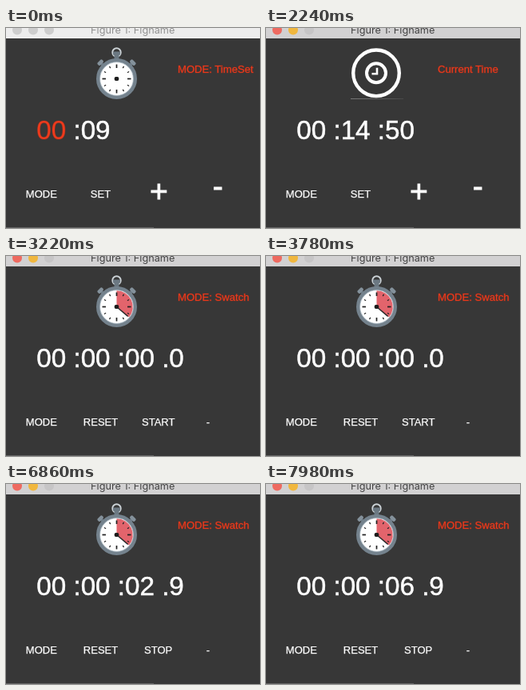
Recreate the animation shown at these times as an HTML page. Size 318 by 250 pixels, loop 8 s.

```html
<!DOCTYPE html>
<html lang="en">
<head>
<meta charset="utf-8">
<title>Stopwatch window</title>
<style>
  html, body { margin: 0; width: 100%; height: 100%; overflow: hidden; background: #373737; }
  svg { display: block; width: 318px; height: 250px; }
  text { font: 13px "Liberation Sans", Arial, sans-serif; fill: #fff; stroke: #fff; stroke-width: .25; white-space: pre; }
  .center { text-anchor: middle; }
  #title { font: 12.7px Inter, sans-serif; fill: #454545; stroke: none; }
  #mode { font-size: 13.1px; }
  #digits { font-size: 33.2px; stroke-width: .5; }
  .large { font-size: 39px; stroke-width: .9; }
  #mode, .selected { fill: #ee3a1c; stroke: #a8301c; stroke-opacity: .5; stroke-width: 1.2; paint-order: stroke; }
  #bar { fill: #d2d1d2; }
  .red { fill: #ee6a60; }
  .yellow { fill: #f0b73e; }
  .grey { fill: #c6c5c6; }
  .inactive #bar { fill: #ededed; }
  .inactive #title { fill: #929292; }
  .inactive circle { fill: #cdcdcd; }
  [hidden] { display: none; }
</style>
</head>
<body>
<svg viewBox="0 0 318 250">
  <defs>
    <linearGradient id="edge">
      <stop offset="0" stop-color="#777"/>
      <stop offset=".45" stop-color="#666"/>
      <stop offset="1" stop-color="#484848"/>
    </linearGradient>
  </defs>
  <rect width="318" height="250" fill="#373737"/>
  <path d="M0 249.5H185" stroke="#626262"/>

  <g id="window">
    <rect id="bar" width="318" height="13"/>
    <circle class="red" cx="14" cy="2.5" r="6"/>
    <circle class="yellow" cx="34" cy="2.5" r="6"/>
    <circle class="grey" cx="54" cy="2.5" r="6"/>
    <text id="title" class="center" x="158.7" y="7">Figure 1: Figname</text>
  </g>

  <g id="watch" transform="translate(138.5 63.5)">
    <g fill="#6b7882">
      <circle cy="-33" r="5.2" fill="none" stroke="#cbd2d6" stroke-width="2"/>
      <rect x="-3" y="-32" width="6" height="8"/>
      <rect x="-4.5" y="-34" width="9" height="4.5" rx="1.5"/>
      <g id="buttons"></g>
    </g>
    <circle r="23.2" fill="#fff" stroke="#74828d" stroke-width="4.6"/>
    <circle r="20.9" fill="none" stroke="#a9b6c0" stroke-width=".8"/>
    <path id="sector" fill="#e2646c"/>
    <g id="ticks" stroke="#222"></g>
    <path id="hand" stroke="#2b2b2b" stroke-width="1.5" stroke-linecap="round"/>
    <rect x="-2.8" y="-2.4" width="5.6" height="4.8" rx="1.9" fill="#1d1d1d"/>
  </g>

  <g id="clock" fill="none" stroke="#fff" transform="translate(138 56.3)">
    <circle r="28.8" stroke-width="4.4"/>
    <circle r="12" stroke-width="4"/>
    <path d="M1 -6.5V1H-5.5" stroke-width="2.6"/>
    <rect x="-32" y="31.7" width="66" height="1" fill="url(#edge)" stroke="none"/>
  </g>

  <text id="mode" x="215" y="56"></text>
  <text id="digits" x="38.3" y="139"><tspan id="hours">00</tspan><tspan id="rest"></tspan></text>

  <text class="center" x="44.3" y="212">MODE</text>
  <text id="second" class="center" x="118.5" y="212"></text>
  <g id="setKeys">
    <text class="center large" x="191.5" y="216.5">+</text>
    <text class="center large" x="265.3" y="210.5">-</text>
  </g>
  <g id="runKeys">
    <text id="third" class="center" x="190.7" y="212"></text>
    <text class="center" x="253" y="212">-</text>
  </g>
</svg>
<script>
const LOOP = 8000, ACTIVE = 1400, CLOCK = 2170, TICK = 2590, SWATCH = 3220, RUN = 6020;
const FRAME = 70, SECOND = 280;
const TENTHS = [9, 4, 6, 9];

const $ = id => document.getElementById(id);
const polar = (degrees, radius) => {
  const a = degrees * Math.PI / 180;
  return `${(radius * Math.sin(a)).toFixed(2)} ${(-radius * Math.cos(a)).toFixed(2)}`;
};
const show = (id, visible) => $(id).toggleAttribute("hidden", !visible);
const write = (id, text) => {
  if ($(id).textContent !== text) $(id).textContent = text;
};

function drawWatch() {
  for (let i = 0; i < 12; i++) {
    const main = i % 3 === 0;
    $("ticks").innerHTML += `<path d="M${polar(i * 30, main ? 13.5 : 15.5)}L${polar(i * 30, 18)}"
      stroke-width="${main ? 1.7 : 1.2}"/>`;
  }
  $("buttons").innerHTML = [-45, 45].map(angle =>
    `<g transform="rotate(${angle})"><rect x="-2" y="-28" width="4" height="5"/>
     <rect x="-4" y="-31" width="8" height="4.5" rx="1.5" fill="#84919b"/></g>`).join("");
  $("sector").setAttribute("d", `M0 0V-20.3A20.3 20.3 0 0 1 ${polar(130, 20.3)}Z`);
  $("hand").setAttribute("d", `M0 0L${polar(130, 18)}`);
}

// The counter pauses on each ninth tenth for one extra frame.
function elapsed(t) {
  const step = Math.floor((t - RUN) / FRAME);
  if (step < 2) return " :00 :00 .0";
  const seconds = Math.floor((step - 2) * FRAME / SECOND);
  const tenth = TENTHS[(step - 1) % 4];
  return ` :00 :${String(seconds).padStart(2, "0")} .${tenth}`;
}

function render(t) {
  const setting = t < CLOCK, swatch = t >= SWATCH;
  $("window").classList.toggle("inactive", t < ACTIVE);
  $("hours").classList.toggle("selected", setting);
  show("watch", setting || swatch);
  show("clock", !setting && !swatch);
  show("sector", swatch);
  show("hand", swatch);
  show("setKeys", !swatch);
  show("runKeys", swatch);
  write("mode", setting ? "MODE: TimeSet" : swatch ? "MODE: Swatch" : "Current Time");
  write("rest", setting ? " :09" : swatch ? elapsed(t) : t < TICK ? " :14 :50" : " :14 :51");
  write("second", swatch ? "RESET" : "SET");
  write("third", t < RUN ? "START" : "STOP");
}

let start;
function frame(now) {
  start ??= now;
  render((now - start) % LOOP);
  requestAnimationFrame(frame);
}

drawWatch();
render(0);
requestAnimationFrame(frame);
</script>
</body>
</html>
```
